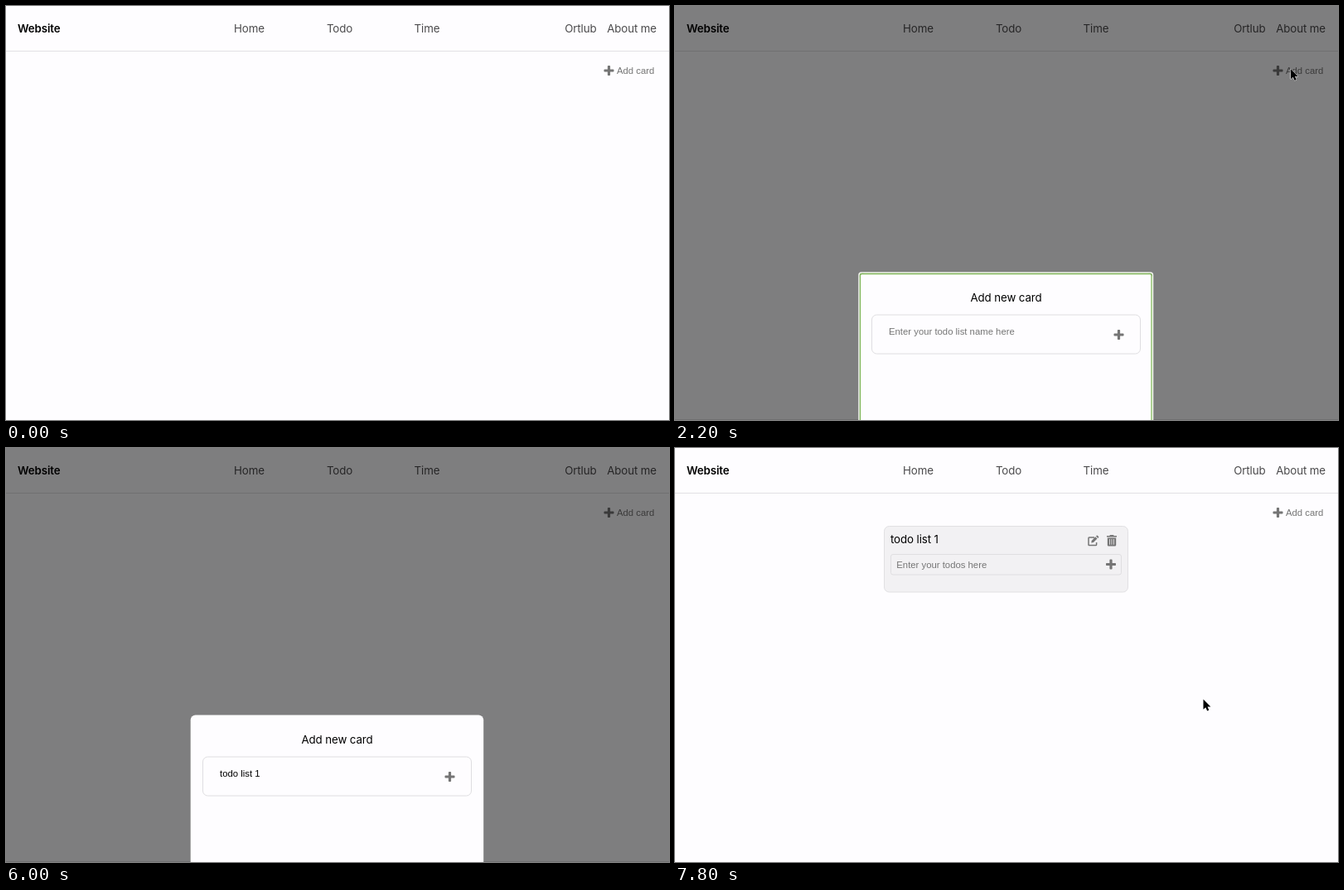
Animation of 800 by 500 pixels, one loop 8 s. Source, as an HTML page:

```html
<!DOCTYPE html>
<html lang="en">
<head>
<meta charset="utf-8">
<title>Todo cards</title>
<style>
  html, body { margin: 0; width: 100%; height: 100%; overflow: hidden; background: #fefdff; }
  svg { display: block; width: 800px; height: 500px; }
  text { font: 13.3px Inter, sans-serif; letter-spacing: -.1px; white-space: pre; }
  .nav text { fill: #4b4a4c; }
  .nav .brand { font-weight: 600; fill: #000; }
  .small { font: 11.33px "Liberation Sans", Arial, sans-serif; letter-spacing: 0; }
  .hint { fill: #757575; }
  .mid { text-anchor: middle; }
  .end { text-anchor: end; }
  .icon { fill: #757575; }
  .frame { fill: none; stroke: #dfdee1; }
</style>
</head>
<body>
<svg viewBox="0 0 800 500">
  <defs>
    <path id="plus" d="M-1.6-5.2q0-.8.8-.8H.8q.8 0 .8.8v3.6h3.6q.8 0 .8.8V.8q0 .8-.8.8H1.6v3.6q0 .8-.8.8H-.8q-.8 0-.8-.8V1.6h-3.6q-.8 0-.8-.8V-.8q0-.8.8-.8h3.6z"/>
  </defs>
  <rect width="800" height="500" fill="#fefdff"/>

  <g class="nav">
    <text class="brand" x="14" y="31.5">Website</text>
    <text class="mid" x="293.5" y="31.5">Home</text>
    <text class="mid" x="402.5" y="31.5">Todo</text>
    <text class="mid" x="508" y="31.5">Time</text>
    <text class="end" x="712.5" y="31.5">Ortlub</text>
    <text class="end" x="785" y="31.5">About me</text>
    <path d="M0 54.5H800" stroke="#e2e1e4"/>
  </g>

  <g id="addCard">
    <use href="#plus" x="727.5" y="78"/>
    <text class="small" x="737" y="82">Add card</text>
  </g>

  <g id="card">
    <rect x="252.5" y="94.5" width="294" height="79.5" rx="6" fill="#f2f1f3" stroke="#e1e0e3"/>
    <text x="260" y="114.5">todo list 1</text>
    <rect class="frame" x="260.5" y="128.5" width="278" height="24.5" rx="2.5"/>
    <text class="small hint" x="267.3" y="144.5">Enter your todos here</text>
    <g class="icon">
      <use href="#plus" x="526" y="140.5"/>
      <path d="M506 108h-6.200q-.8 0-.8.8v8q0 .8.8.8h8q.8 0 .8-.8V114" fill="none" stroke="#757575" stroke-width="1.5"/>
      <path d="M502.300 114.500l.4-2.600 4.600-4.600 2.200 2.200-4.600 4.600zM508 106.600l.8-.8q.5-.4 1 0l1.300 1.300q.4.5 0 1l-.8.8z"/>
      <path fill-rule="evenodd" d="M521 106h3.300l.7-1h4l.7 1h3.300v1.600h-12zM521.800 108.400h10.400v8.800q0 1.300-1.300 1.300h-7.800q-1.300 0-1.300-1.300zM524 110v6.800h.8V110zM526.600 110v6.800h.8V110zM529.200 110v6.800h.8V110z"/>
    </g>
  </g>

  <g id="modal">
    <rect width="800" height="500" fill="#000" opacity=".5"/>
    <path d="M0 499.500H800" stroke="#000" opacity=".1"/>
    <rect x="222.700" y="322.500" width="353.500" height="200" rx="6" fill="#fefdff"/>
    <g id="ring" fill="none">
      <rect x="222" y="322" width="354.500" height="200" rx="3" stroke="#f4f8ef" stroke-width="1.500"/>
      <rect x="223.500" y="323.500" width="351.500" height="200" rx="2" stroke="#83b85c" stroke-width="1.300"/>
    </g>
    <text class="mid" x="399.500" y="356.500">Add new card</text>
    <rect class="frame" x="237.500" y="373" width="324" height="47" rx="6"/>
    <text id="field" class="small" x="258" y="397"></text>
    <rect id="caret" y="386.500" width="1" height="13"/>
    <use class="icon" href="#plus" x="535.500" y="397"/>
  </g>

  <path id="arrow" d="M0 0V12.300L2.800 9.700 4.700 14 6.800 13.100 5 8.900H8.900Z" stroke="#fff" stroke-width="1" paint-order="stroke"/>
  <path id="beam" d="M-2-7.500Q0-7.500 0-6V6Q0 7.500-2 7.500M2-7.500Q0-7.500 0-6M0 6Q0 7.500 2 7.500" fill="none" stroke="#222"/>
</svg>
<script>
const LOOP = 8000, STEP = 200;
const $ = id => document.getElementById(id);
const show = (id, on) => $(id).setAttribute('visibility', on ? 'visible' : 'hidden');
const within = (t, from, to) => t >= from && t < to;

// Pointer visits: [time, x, y]; the pointer is hidden outside these spans.
const visits = [
  { until: 3800, points: [
    [400, 21, 366], [600, 150, 300], [800, 370, 190], [1000, 600, 105], [1200, 752, 66],
    [1400, 747, 80], [1600, 743, 76], [2200, 743, 76], [2400, 715, 110], [2600, 620, 215],
    [2800, 480, 335], [3000, 350, 393], [3200, 335, 393]] },
  { until: LOOP, points: [
    [6800, 400, 440], [7000, 480, 474], [7200, 550, 455], [7400, 590, 390],
    [7600, 609, 341], [7800, 637.500, 303.500]] }
];

const typing = [
  [3800, 't'], [4000, 'to'], [4200, 'tod'], [4400, 'todo'], [4600, 'todo '],
  [4800, 'todo l'], [5000, 'todo list '], [5600, 'todo list 1'], [6600, '']
];

function pointerAt(t) {
  const visit = visits.find(v => within(t, v.points[0][0], v.until));
  if (!visit) return null;
  const next = visit.points.findIndex(p => p[0] > t);
  if (next < 0) return visit.points.at(-1).slice(1);
  const [t0, x0, y0] = visit.points[next - 1], [t1, x1, y1] = visit.points[next];
  const k = (t - t0) / (t1 - t0);
  return [x0 + (x1 - x0) * k, y0 + (y1 - y0) * k];
}

function drawPointer(t) {
  const pos = pointerAt(t);
  const overField = within(t, 3000, 3800);
  show('arrow', pos && !overField);
  show('beam', pos && overField);
  if (pos) $(overField ? 'beam' : 'arrow').setAttribute('transform', `translate(${pos})`);
}

function drawField(t) {
  const typed = typing.findLast(([start]) => t >= start)?.[1] ?? '';
  const field = $('field');
  field.textContent = typed || 'Enter your todo list name here';
  field.classList.toggle('hint', !typed);
  show('caret', within(t, 3200, 6000) || within(t, 6600, 7200));
  $('caret').setAttribute('x', 258 + (typed ? field.getComputedTextLength() + .5 : 0));
}

function draw(now) {
  const t = Math.floor(now % LOOP / STEP) * STEP;
  const open = within(t, 2200, 7800);
  $('addCard').setAttribute('fill', within(t, 1800, 2200) ? '#000' : t === 1600 ? '#3a3a3a' : '#757575');
  show('card', t >= 6600);
  $('modal').style.display = open ? '' : 'none';
  show('ring', t < 3200);
  if (open) drawField(t);
  drawPointer(t);
  requestAnimationFrame(() => draw(performance.now() - start));
}

const start = performance.now();
draw(0);
</script>
</body>
</html>
```
